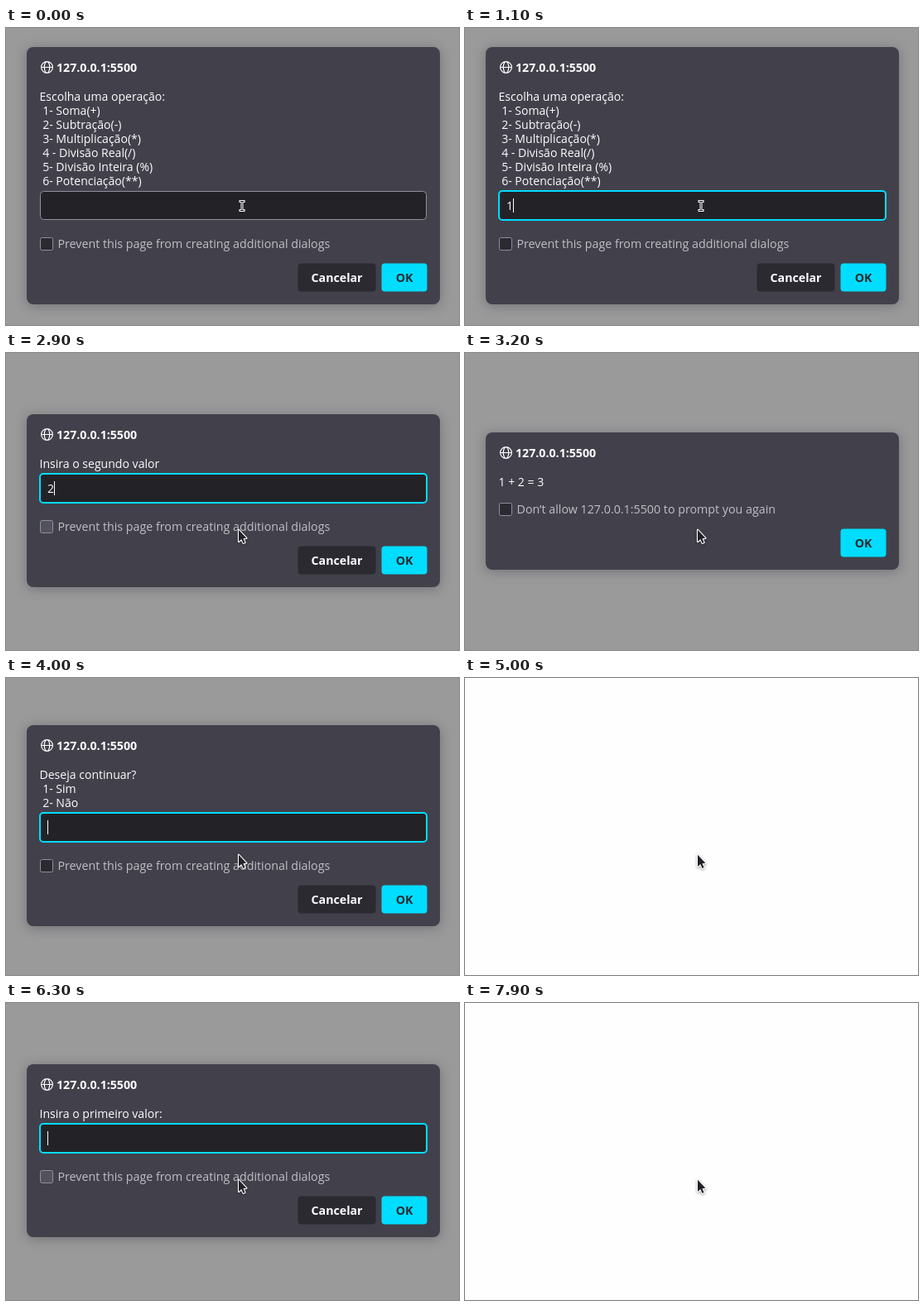
An HTML page with a canvas for the animation above (8 s loop, 547 by 359 pixels).

```html
<!DOCTYPE html>
<html lang="pt">
<head>
<meta charset="utf-8">
<title>Calculadora</title>
<style>
html, body { margin: 0; width: 100%; height: 100%; overflow: hidden; background: #fefefe; }
canvas { display: block; width: 547px; height: 359px; }
</style>
</head>
<body>
<canvas id="stage"></canvas>
<script>
const W = 547, H = 359, LOOP = 8000;
const LEFT = 25, WIDTH = 499, LINE = 17;
const FAMILY = '"Open Sans", "Noto Sans", sans-serif';
const PLAIN = `500 14.05px ${FAMILY}`;
const LABEL = `500 14.25px ${FAMILY}`;
const BOLD = `bold 14.2px ${FAMILY}`;
const CYAN = '#00ddff', DARK = '#2b2a31', EDGE = '#8f8f9d', WHITE = '#fdfdff';

const canvas = document.getElementById('stage');
const ctx = canvas.getContext('2d');
const ratio = window.devicePixelRatio || 1;
canvas.width = Math.round(W * ratio);
canvas.height = Math.round(H * ratio);

const PREVENT = 'Prevent this page from creating additional dialogs';
const menu = {
  lines: ['Escolha uma operação:', ' 1- Soma(+)', ' 2- Subtração(-)', ' 3- Multiplicação(*)',
    ' 4 - Divisão Real(/)', ' 5- Divisão Inteira (%)', ' 6- Potenciação(**)'],
  input: true, check: PREVENT, beam: true
};
const first = { lines: ['Insira o primeiro valor:'], input: true, check: PREVENT, hover: true };
const second = { lines: ['Insira o segundo valor'], input: true, check: PREVENT, hover: true };
const result = { lines: ['1 + 2 = 3'], check: 'Don’t allow 127.0.0.1:5500 to prompt you again' };
const again = { lines: ['Deseja continuar?', ' 1- Sim', ' 2- Não'], input: true, check: PREVENT };

// start time, dialog (null = bare page), typed value, focus, caret
const steps = [
  [0, menu, '', false, false],
  [500, menu, '', true, true],
  [1100, menu, '1', true, true],
  [1400, first, '', true, true],
  [2300, first, '1', true, true],
  [2400, null],
  [2500, second, '', true, true],
  [2900, second, '2', true, true],
  [3100, null],
  [3200, result],
  [4000, again, '', true, true],
  [4800, again, '1', true, true],
  [5000, null],
  [5100, menu, '', true, true],
  [5800, menu, '2', true, true],
  [6200, null],
  [6300, first, '', true, true],
  [7200, first, '2', true, true],
  [7500, first, '2', true, false],
  [7900, null]
];

function box(x, y, w, h, r, fill, stroke, line = 1) {
  ctx.beginPath();
  ctx.roundRect(x, y, w, h, r);
  ctx.fillStyle = fill;
  ctx.fill();
  if (stroke) {
    ctx.strokeStyle = stroke;
    ctx.lineWidth = line;
    ctx.stroke();
  }
}

function text(str, x, y, font, color, align = 'left') {
  ctx.font = font;
  ctx.fillStyle = color;
  ctx.textAlign = align;
  ctx.fillText(str, x, y);
}

function globe(x, y) {
  ctx.strokeStyle = WHITE;
  ctx.lineWidth = 1.2;
  ctx.beginPath();
  ctx.arc(x, y, 6.9, 0, 7);
  ctx.moveTo(x + 3.2, y);
  ctx.ellipse(x, y, 3.2, 6.9, 0, 0, 7);
  ctx.moveTo(x - 6.9, y);
  ctx.lineTo(x + 6.9, y);
  ctx.stroke();
}

function outline(points) {
  ctx.beginPath();
  points.forEach(([x, y]) => ctx.lineTo(x, y));
  ctx.closePath();
}

function arrow() {
  ctx.save();
  ctx.translate(281, 213.7);
  ctx.scale(0.92, 0.92);
  outline([[0, 0], [0, 15.6], [3.6, 12.4], [6, 17.6], [8.2, 16.6], [5.9, 11.4], [10.2, 11]]);
  ctx.lineJoin = 'round';
  ctx.shadowColor = 'rgba(0,0,0,.4)';
  ctx.shadowBlur = 3 * ratio;
  ctx.shadowOffsetY = ratio;
  ctx.strokeStyle = '#fff';
  ctx.lineWidth = 2.4;
  ctx.stroke();
  ctx.shadowColor = 'transparent';
  ctx.fillStyle = '#222127';
  ctx.fill();
  ctx.restore();
}

function beam() {
  ctx.beginPath();
  for (const y of [209.5, 220.5]) {
    ctx.moveTo(283, y);
    ctx.lineTo(287, y);
  }
  ctx.moveTo(285, 209.5);
  ctx.lineTo(285, 220.5);
  ctx.lineCap = 'square';
  ctx.strokeStyle = '#fff';
  ctx.lineWidth = 3;
  ctx.stroke();
  ctx.strokeStyle = '#222127';
  ctx.lineWidth = 1;
  ctx.stroke();
  ctx.lineCap = 'butt';
}

function field(y, value, focus, caret) {
  if (focus) box(41, y, 467, 35, 4, '#232327', CYAN, 2);
  else box(41.5, y + 0.5, 466, 34, 4, '#232327', EDGE);
  text(value, 50, y + 23, PLAIN, WHITE);
  if (caret) {
    ctx.fillStyle = WHITE;
    ctx.fillRect(value ? 58 : 50, y + 9, 1, 17);
  }
}

function button(x, w, y, label, fill, color) {
  box(x - 0.5, y - 0.5, w + 1, 34, 4, fill);
  text(label, x + w / 2, y + 22, BOLD, color, 'center');
}

function dialog(d, value, focus, caret) {
  const extra = (d.lines.length - 1) * LINE;
  const height = (d.input ? 209 : 166) + extra;
  const top = Math.floor((H - height) / 2) - (d.input ? 1 : 0);
  const bottom = top + height;

  ctx.fillStyle = '#9a9a9b';
  ctx.fillRect(0, 0, W, H);
  ctx.save();
  ctx.shadowColor = 'rgba(40,40,50,.35)';
  ctx.shadowBlur = 14 * ratio;
  ctx.shadowOffsetY = 2 * ratio;
  box(LEFT, top, WIDTH, height, 8, '#42414b');
  ctx.restore();

  globe(49.5, top + 24.5);
  text('127.0.0.1:5500', 61, top + 30, BOLD, WHITE);
  d.lines.forEach((s, i) => text(s, 40.5, top + 65 + i * LINE, PLAIN, WHITE));

  if (d.input) field(top + 72 + extra, value, focus, caret);
  const checkY = top + extra + (d.input ? 128 : 85);
  box(41.5, checkY + 0.5, 15, 15, 2, d.hover ? '#52525e' : DARK, EDGE);
  text(d.check, 62.5, checkY + 13, LABEL, '#bfbfc6');

  if (d.input) button(353, 93, bottom - 49, 'Cancelar', DARK, WHITE);
  button(454, 54, bottom - 49, 'OK', CYAN, DARK);
}

function draw(time) {
  const [, d, value, focus, caret] = steps.findLast(s => s[0] <= time);
  ctx.setTransform(ratio, 0, 0, ratio, 0, 0);
  if (d) {
    dialog(d, value, focus, caret);
  } else {
    ctx.fillStyle = '#fefefe';
    ctx.fillRect(0, 0, W, H);
  }
  if (d && d.beam) beam();
  else arrow();
}

const start = performance.now();
function tick() {
  draw((performance.now() - start) % LOOP);
  requestAnimationFrame(tick);
}
tick();
</script>
</body>
</html>
```
